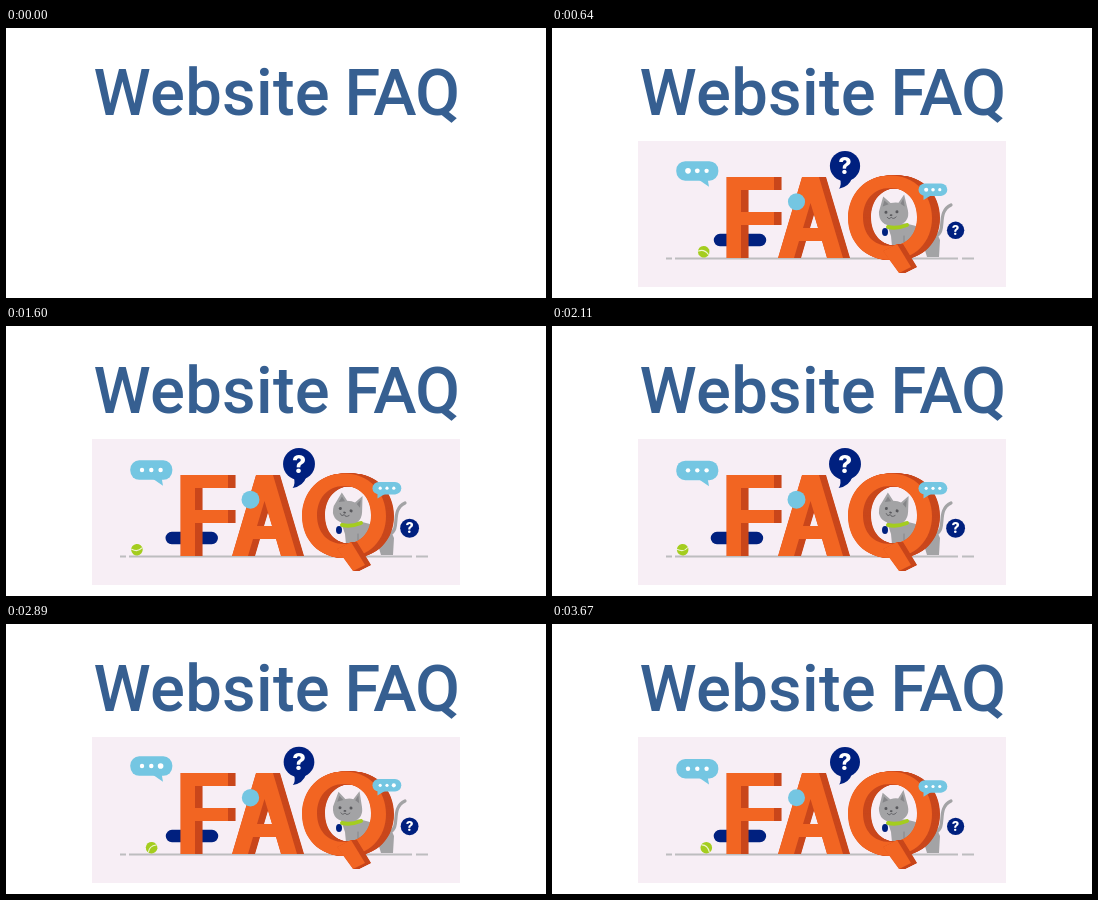
Write an HTML page with a canvas that moves like this. It is 540 px wide and 270 px high and loops after 3.7 s.

```html
<!DOCTYPE html>
<html lang="en">
<head>
<meta charset="utf-8">
<title>Website FAQ</title>
<style>
html, body { margin: 0; width: 100%; height: 100%; overflow: hidden; background: #fff; }
canvas { display: block; }
</style>
</head>
<body>
<canvas id="stage" width="540" height="270"></canvas>
<script>
const ctx = document.getElementById('stage').getContext('2d');
const LOOP = 3700, INTRO = 100, STEP = 30, BOB = 1800;
const ORANGE = '#f26522', RUST = '#c9471c', NAVY = '#00207f', SKY = '#74c6e2',
      PANEL = '#f7eef5', GREY = '#a3a3a5', SHADE = '#858588', DARK = '#58585c',
      LIME = '#a4cd1f', WHITE = '#fff';
const TAU = Math.PI * 2;

const easeInOut = s => s < 0.5 ? 4 * s ** 3 : 1 - 4 * (1 - s) ** 3;

function fill(color, path, rule = 'nonzero') {
  ctx.fillStyle = color;
  ctx.fill(path, rule);
}

function stroke(color, width, d) {
  ctx.strokeStyle = color;
  ctx.lineWidth = width;
  ctx.lineCap = 'round';
  ctx.stroke(new Path2D(d));
}

function ellipse(x, y, rx, ry = rx) {
  const path = new Path2D();
  path.ellipse(x, y, rx, ry, 0, 0, TAU);
  return path;
}

function pill(x, y, w, h, color, r = h / 2) {
  const path = new Path2D();
  path.roundRect(x, y, w, h, r);
  fill(color, path);
}

function at(x, y, draw, angle = 0, scale = 1) {
  ctx.save();
  ctx.translate(x, y);
  ctx.rotate(angle);
  ctx.scale(scale, scale);
  draw();
  ctx.restore();
}

function extrude(path, depth) {
  for (let x = depth; x > 0; x -= 0.4) {
    at(x, 0, () => fill(RUST, path, 'evenodd'));
  }
  fill(ORANGE, path, 'evenodd');
}

function words(text, x, y, font, color, spacing = 0, align = 'left') {
  ctx.font = font;
  ctx.letterSpacing = spacing + 'px';
  ctx.textAlign = align;
  ctx.fillStyle = color;
  ctx.fillText(text, x, y);
}

function drawTitle() {
  const font = '500 65px Roboto, sans-serif';
  words('Website', 87.5, 87, font, '#365f91', 0.3);
  words('FAQ', 338.5, 87, font, '#365f91', -0.8);
}

function drawGround() {
  ctx.fillStyle = '#bdbdbf';
  for (const [from, to] of [[114, 120], [123, 406], [410, 422]]) {
    ctx.fillRect(from, 229.5, to - from, 2);
  }
}

const letterF = new Path2D('M174.5 149H222V162H189V184H222V197H189V230H174.5Z');
const letterA = new Path2D('M250 149H267L291 230H275L270 213H247L242 230H226Z' +
  'M258.5 175L251 200H266Z');
const ringQ = new Path2D('M338 147.5C363 147.5 380 166 380 190C380 214 363 232 338 232' +
  'C313 232 296 214 296 190C296 166 313 147.5 338 147.5Z' +
  'M338 160C321 160 311 173 311 189C311 206 321 218 338 218C355 218 365 206 365 189C365 173 355 160 338 160Z');
const tailQ = new Path2D('M331 223L345 216L359 239L347 245Z');

function drawLetters() {
  extrude(letterF, 7.5);
  extrude(letterA, 7);
  extrude(ringQ, 8);
  extrude(tailQ, 6);
}

function drawHead() {
  fill(GREY, new Path2D('M-14 -2L-9 -17L-2 -10Q3 -11 6 -10L12 -18L15 -2Q17 11 2 13Q-15 13 -14 -2Z'));
  fill(SHADE, new Path2D('M-10 -7L-8 -13L-4 -9ZM8 -9L11 -14L12 -6Z'));
  fill(DARK, ellipse(-7, -1, 1.5));
  fill(DARK, ellipse(4, -1, 1.5));
  fill(DARK, ellipse(-2, 2, 1.4, 0.9));
  stroke(DARK, 0.8, 'M-6 4Q-4 7 -2 4Q0 7 3 4');
}

function drawCatBody() {
  fill(GREY, new Path2D('M335 196Q350 193 364 198Q384 200 388 212L387 229H375L372 219H360V229H341L339 208Z'));
  stroke(SHADE, 1, 'M352 208V220');
  stroke(GREY, 3.2, 'M384 208C395 203 384 184 399 177');
}

function drawCatHead(p) {
  at(341, 185, drawHead, -0.08 + 0.3 * p);
  stroke(LIME, 4, 'M336 199Q345 201 355 197');
  fill(NAVY, ellipse(333, 204, 3, 4));
}

function drawDots(x, y, gap, radius, time) {
  for (let i = 0; i < 3; i++) {
    const phase = (time % BOB - 500 - i * 220) / 300;
    const grow = Math.abs(phase) < 1 ? Math.cos(phase * Math.PI / 2) ** 2 : 0;
    fill(WHITE, ellipse(x + i * gap, y, radius * (1 + 0.3 * grow)));
  }
}

function drawChats(time) {
  const bob = Math.cos(TAU * time / BOB);
  at(124, 133.6 + 1.4 * bob, () => {
    pill(0.3, 0, 42, 19.5, SKY, 9);
    fill(SKY, new Path2D('M22 18L33 25.5L31.5 17Z'));
    drawDots(12, 9.7, 9.3, 2.2, time);
  });
  at(366.5, 155.6 + 0.6 * bob, () => {
    pill(0, 0, 28.8, 12.5, SKY);
    fill(SKY, new Path2D('M5 10L5 16.5L14 11Z'));
    drawDots(7.7, 6.3, 6.8, 1.6, time);
  });
}

function drawQuestions(p) {
  at(293, 138, () => {
    fill(NAVY, ellipse(0, 0, 15));
    fill(NAVY, new Path2D('M-5 12Q-3 19 -6 22.5Q4 21 7 12Z'));
    words('?', 0, 8, '800 23px Inter, sans-serif', WHITE, 0, 'center');
  }, 0, 1 + 0.065 * p);
  at(403.6, 202.3, () => {
    fill(NAVY, ellipse(0, 0, 8.6));
    words('?', 0, 4.6, '800 13px Inter, sans-serif', WHITE, 0, 'center');
  }, 0, 1 + 0.1 * p);
}

function drawBall(p) {
  const travel = -23.8 * p;
  at(154.3 + travel, 223.7, () => {
    fill(LIME, ellipse(0, 0, 5.8));
    stroke('#eef6cf', 1.1, 'M-4.5 -2.8Q1.5 -2.5 3 4.3');
  }, travel / 5.8);
}

function drawScene(time) {
  const u = time / 3600;
  const p = easeInOut(1 - Math.abs(1 - 2 * u));
  ctx.fillStyle = PANEL;
  ctx.fillRect(86, 113, 368, 146);
  drawGround();
  pill(160.3 + 1.6 * Math.cos(TAU * (u - 0.08)), 205.8, 52.5, 12.5, NAVY);
  drawCatBody();
  drawLetters();
  fill(SKY, ellipse(244.5, 173.7, 8.5 + 0.5 * p));
  drawCatHead(p);
  drawChats(time);
  drawQuestions(p);
  drawBall(p);
}

const start = performance.now();
function render() {
  const now = (performance.now() - start) % LOOP;
  ctx.fillStyle = WHITE;
  ctx.fillRect(0, 0, 540, 270);
  drawTitle();
  if (now >= INTRO) drawScene(Math.floor((now - INTRO) / STEP) * STEP);
  requestAnimationFrame(render);
}
render();
</script>
</body>
</html>
```
